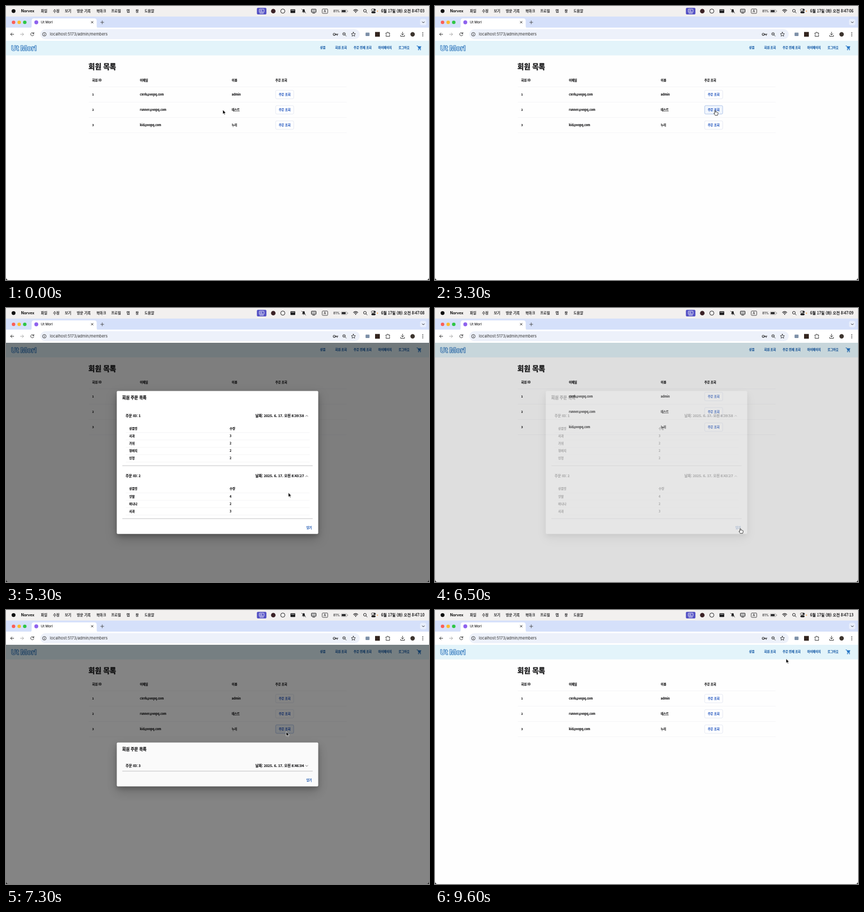
An HTML page for the animation above (10 s loop, 800 by 520 pixels).

```html
<!DOCTYPE html>
<html lang="ko">
<head>
<meta charset="utf-8">
<title>회원 목록</title>
<style>
html, body { margin: 0; width: 100%; height: 100%; overflow: hidden; background: #fff; }
svg { display: block; }
text { font-family: "Noto Sans CJK KR", "Noto Sans CJK JP", "Noto Sans CJK", sans-serif; white-space: pre; }
text.ui { font-family: Inter, Roboto, sans-serif; }
.paper { filter: drop-shadow(0 4px 4px rgba(0, 0, 0, .2)) drop-shadow(0 8px 10px rgba(0, 0, 0, .22)); }
</style>
</head>
<body>
<svg id="stage" width="800" height="520" viewBox="0 0 800 520"></svg>
<script>
const NS = 'http://www.w3.org/2000/svg';
const stage = document.getElementById('stage');
const LOOP = 10000, STEP = 100, BLUE = '#2a62b8', INK = '#1c1c1e';

function set(node, attrs) {
  for (const k in attrs) node.setAttribute(k, attrs[k]);
  return node;
}
function el(parent, tag, attrs = {}) {
  return parent.appendChild(set(document.createElementNS(NS, tag), attrs));
}
const rect = (p, x, y, width, height, fill, more) => el(p, 'rect', { x, y, width, height, fill, ...more });
const dot = (p, cx, cy, r, fill, more) => el(p, 'circle', { cx, cy, r, fill, ...more });
const line = (p, d, stroke = INK, width = 1, more) =>
  el(p, 'path', { d, stroke, 'stroke-width': width, fill: 'none', 'stroke-linecap': 'round', 'stroke-linejoin': 'round', ...more });
const shape = (p, d, fill, more) => el(p, 'path', { d, fill, ...more });

// Text centred vertically on cy; a thin outline thickens the Korean face
function label(p, str, x, cy, size, weight = 700, fill = INK, more) {
  const t = el(p, 'text', {
    x, y: cy + size * .37, 'font-size': size, 'font-weight': weight, fill,
    stroke: fill, 'stroke-width': size * .035, 'stroke-linejoin': 'round', ...more
  });
  t.textContent = str;
  return t;
}
const ui = { class: 'ui', stroke: 'none' };

/* ---------- menu bar ---------- */
function menuBar(g) {
  rect(g, 0, 0, 800, 21, '#f2f0ef');
  dot(g, 14.3, 9.6, 3.7, '#111');
  label(g, 'Norvex', 28.5, 9.8, 7.1, 700, '#111', ui);
  const items = { 파일: 66, 수정: 89, 보기: 111.3, '방문 기록': 134, 북마크: 171, 프로필: 199, 탭: 228, 창: 245, 도움말: 262 };
  for (const k in items) label(g, k, items[k], 9.7, 6.6, 500);

  rect(g, 474.5, 3.5, 18, 12.5, '#5350c4', { rx: 2 });
  rect(g, 479, 6, 9, 6, 'none', { stroke: '#fff', 'stroke-width': .9, rx: .8 });
  line(g, 'M480 14H487M481 8.2H484M481 10H485', '#fff', .8);
  dot(g, 505.5, 9.7, 4.3, '#3b2226');
  dot(g, 523.5, 9.7, 4, 'none', { stroke: INK, 'stroke-width': 1 });
  rect(g, 538, 6.2, 9, 7, INK, { rx: 1 });
  line(g, 'M539.5 8.2H545.5', '#f1eff0', .8);
  shape(g, 'M559.5 11.5L561 10V8.2Q561 6 563 6T565 8.2V10L566.5 11.5ZM562 12.3H564Q563 14 562 12.3Z', INK);
  line(g, 'M559 6L567 13.5', INK, .8);
  rect(g, 577.5, 6, 9, 6, '#bbb', { stroke: INK, 'stroke-width': .9, rx: .8 });
  line(g, 'M580 13.7H584', INK, .9);
  rect(g, 598, 5.7, 10.5, 8.3, 'none', { stroke: INK, 'stroke-width': .8, rx: 1.5 });
  label(g, 'A', 603.2, 9.8, 6, 500, INK, { ...ui, 'text-anchor': 'middle' });
  label(g, '81%', 619, 9.8, 6, 500, INK, ui);
  rect(g, 634, 7, 11, 5.6, 'none', { stroke: '#888', 'stroke-width': .7, rx: 1.6 });
  rect(g, 635, 8, 7.5, 3.6, INK, { rx: .8 });
  rect(g, 645.7, 8.8, 1, 2, '#888');
  line(g, 'M657.2 8.4Q661.3 4.8 665.4 8.4M658.8 10.1Q661.3 8 663.8 10.1', INK, 1.2);
  dot(g, 661.3, 12, 1, INK);
  dot(g, 678.8, 9, 2.6, 'none', { stroke: INK, 'stroke-width': 1 });
  line(g, 'M680.8 11L683 13.2');
  rect(g, 691, 5.7, 8, 3.4, 'none', { stroke: INK, 'stroke-width': .8, rx: 1.7 });
  rect(g, 691, 10.2, 8, 3.6, INK, { rx: 1.8 });
  dot(g, 697, 7.4, 1.6, INK);
  dot(g, 702.5, 9.7, 1, '#f0902a');
  return label(g, '', 791.5, 9.7, 7.2, 500, INK, { 'text-anchor': 'end' });
}

/* ---------- browser frame ---------- */
function browser(g) {
  rect(g, 0, 20, 800, 22, '#d5e0fa');
  ['#fb5f57', '#fdbc2e', '#2fc646'].forEach((c, i) => dot(g, 14.3 + i * 10.6, 31, 3.3, c));
  shape(g, 'M45 41.5Q48.5 41.5 48.5 38V28Q48.5 23.5 53 23.5H167Q171.5 23.5 171.5 28V38Q171.5 41.5 175 41.5Z', '#fff');
  dot(g, 57.3, 31, 3.7, '#8e62ee');
  label(g, 'Ut Morl', 66, 31, 6.3, 500, INK, ui);
  line(g, 'M161.2 29L164.8 32.6M164.8 29L161.2 32.6', INK, .9);
  line(g, 'M179 31H185M182 28V34', '#444', .9);
  rect(g, 783, 24.5, 12, 12, '#e8eefc', { rx: 3.5 });
  line(g, 'M787.3 30L789.3 32L791.3 30', INK, 1);

  rect(g, 0, 41, 800, 25, '#fff');
  line(g, 'M14.7 53.7H8.8M11.4 51L8.7 53.7L11.4 56.4', '#333', 1);
  line(g, 'M27.3 53.7H33.2M30.6 51L33.3 53.7L30.6 56.4', '#aaa', 1);
  line(g, 'M52.3 52A3 3 0 1 0 52.6 54.6M52.7 50.2V52.4H50.4', '#333', 1);
  rect(g, 65, 44, 604, 19, '#edf1fa', { rx: 9.5 });
  dot(g, 72.5, 53.7, 3.4, 'none', { stroke: '#333', 'stroke-width': .9 });
  line(g, 'M72.5 53.5V55.3M72.5 51.9V52', '#333', .9);
  label(g, 'localhost:5173/admin/members', 83, 53.6, 7.4, 400, '#333', ui);
  dot(g, 620.8, 53.7, 2, 'none', { stroke: '#333', 'stroke-width': 1.1 });
  line(g, 'M623 53.2H628M623 54.6H627M626.6 54.6V56', '#333', .9);
  dot(g, 639.3, 53, 2.5, 'none', { stroke: '#333', 'stroke-width': 1 });
  line(g, 'M641.3 55L643.5 57.2M638.2 53H640.4', '#333', .9);
  line(g, 'M657 49.6L658.2 52.3L661 52.6L658.9 54.5L659.5 57.3L657 55.8L654.5 57.3L655.1 54.5L653 52.6L655.8 52.3Z', '#333', .9);
  rect(g, 680, 50.6, 7.5, 6.5, '#7d90a8', { rx: 1 });
  rect(g, 698, 49.3, 9, 9, '#33251f');
  line(g, 'M718.8 51.2H721V50.2Q722 48.8 723 50.2V51.2H725.6V53.4Q723.6 54.2 725.6 55.2V57.6H718.8V55.2Q720.8 54.3 718.8 53.4Z', '#333', 1);
  line(g, 'M750 49.5V54.8M747.6 52.7L750 55L752.4 52.7M746.3 55.6V57.5H753.7V55.6', '#333', 1);
  dot(g, 769, 53.7, 4.2, '#3d352f');
  [50.7, 53.7, 56.7].forEach(y => dot(g, 788.3, y, .85, '#333'));
}

/* ---------- page ---------- */
const rowY = [168, 197, 226];

function page(g) {
  rect(g, 0, 66, 800, 454, '#fefefe');
  rect(g, 0, 66, 800, 27.7, '#e3f4fa');
  label(g, 'Ut Morl', 9.8, 79.8, 13.2, 900, '#cfe5f8', { class: 'ui', stroke: '#3a7fbd', 'stroke-width': .9 });
  const nav = { 상품: 594, '회원 조회': 622.5, '주문 전체 조회': 657.5, 마이페이지: 704, 로그아웃: 742.5 };
  for (const k in nav) label(g, k, nav[k], 79.3, 5.6, 900, '#2667ae');
  line(g, 'M777 75.7H778.6L780.4 80.3H784', '#2574c4', 1);
  shape(g, 'M778.8 76.5H785.6L783.8 80H780.2Z', '#2574c4');
  line(g, 'M779.6 81.6H784.4', '#2574c4', .8);
  dot(g, 780.2, 83.1, .9, '#2574c4');
  dot(g, 783.8, 83.1, .9, '#2574c4');

  label(g, '회원 목록', 156, 115, 13.2, 900);
  const cols = [163, 253.3, 427, 509.5];
  ['회원 ID', '이메일', '이름', '주문 조회'].forEach((s, i) => label(g, s, cols[i], 141.4, 5.6));
  line(g, 'M157 153.5H644', '#f4f4f6', .9);
  const rows = [['1', 'clerk@vopq.com', 'admin'], ['2', 'runner@vopq.com', '테스트'], ['3', 'kid@vopq.com', '누리']];
  return rows.map((cells, r) => {
    const y = rowY[r];
    cells.forEach((s, i) => label(g, s, cols[i], y, 5.4));
    line(g, `M157 ${y + 14.5}H644`, '#f4f4f6', .9);
    const b = rect(g, 510, y - 8, 34, 16, '#fff', { rx: 2, 'stroke-width': .8 });
    label(g, '주문 조회', 527, y - .2, 5.6, 700, '#3463c4', { 'text-anchor': 'middle' });
    return b;
  });
}

/* ---------- order dialog ---------- */
let clipCount = 0;

function accordion(parent, order, last) {
  const g = el(parent, 'g');
  const full = 52 + 14 * order.items.length;
  const id = 'clip' + clipCount++;
  const clip = rect(el(el(g, 'defs'), 'clipPath', { id }), 220, 0, 360, 20, '#000');
  const edge = rect(g, 220, 0, 360, 1, '#bbb');

  const head = el(g, 'g');
  label(head, '주문 ID: ' + order.id, 226.3, 0, 6.5);
  label(head, '날짜: 2025. 6. 17. 오전 ' + order.at, 563.5, 0, 6.5, 700, INK, { 'text-anchor': 'end' });
  const arrow = line(head, 'M-2 -1L0 1L2 -1', '#555', .9);

  const body = el(el(g, 'g', { 'clip-path': `url(#${id})` }), 'g');
  [['상품명', '수량'], ...order.items].forEach(([name, n], i) => {
    const y = i ? 38 + 14 * i : 37.5;
    label(body, name, 233, y, 5.6);
    label(body, n, 423, y, 5.6);
    line(body, `M227 ${45 + 14 * i}H574`, '#f1f1f3', .8);
  });

  return (top, p) => {
    const h = 20.5 + p * (full - 20.5);
    set(g, { transform: `translate(0 ${top})` });
    set(clip, { y: 20, height: Math.max(0, h - 20.5) });
    set(edge, { y: h - .6, fill: last || p > .3 ? '#c2c2c5' : '#e6e6e8' });
    set(head, { transform: `translate(0 ${10.25 + 2.75 * p})` });
    set(arrow, { transform: `translate(568.8 .2) rotate(${180 * p})` });
    set(body, { transform: `translate(0 ${5.5 * (p - 1)})`, display: p ? 'inline' : 'none' });
    return h;
  };
}

function dialog(parent, orders) {
  const g = el(parent, 'g');
  const paper = rect(g, 209.5, 0, 381, 100, '#fff', { rx: 2, class: 'paper' });
  const title = el(g, 'g');
  label(title, '회원 주문 목록', 219.7, 12.6, 7.6);
  const parts = orders.map((o, i) => accordion(g, o, i === orders.length - 1));
  const close = el(g, 'g');
  label(close, '닫기', 573.3, 0, 5.6, 700, BLUE, { 'text-anchor': 'middle' });

  return (opacity, open) => {
    set(g, { opacity, display: opacity ? 'inline' : 'none' });
    if (!opacity) return;
    const gap = parts.length > 1 ? 6.5 * Math.max(...open) : 0;
    const heights = parts.map((f, i) => f(0, open[i]));
    const total = 62.9 + gap + heights.reduce((a, b) => a + b);
    const top = 293.1 - total / 2;
    set(paper, { y: top, height: total });
    set(title, { transform: `translate(0 ${top})` });
    let y = top + 34;
    parts.forEach((f, i) => { y += f(y, open[i]) + gap; });
    set(close, { transform: `translate(0 ${top + total - 11.4})` });
  };
}

/* ---------- build ---------- */
const clock = menuBar(el(stage, 'g'));
const buttons = page(el(stage, 'g'));
browser(el(stage, 'g'));
const shade = rect(stage, 0, 66, 800, 454, '#000');
const first = dialog(stage, [
  { id: 1, at: '8:39:58', items: [['사과', 3], ['가위', 2], ['청바지', 2], ['인형', 2]] },
  { id: 2, at: '8:43:27', items: [['양말', 4], ['바나나', 2], ['사과', 3]] }
]);
const second = dialog(stage, [{ id: 3, at: '8:46:04', items: [['사과', 1]] }]);
shape(stage, 'M0 515Q0 520 5 520H0ZM800 515Q800 520 795 520H800Z', '#111');

const pointer = el(stage, 'g');
const arrowCursor = shape(pointer, 'M0 0V8.2L1.9 6.5L3.1 9.3L4.5 8.7L3.3 6H5.9Z', '#000',
  { stroke: '#fff', 'stroke-width': .7, 'stroke-linejoin': 'round' });
const handCursor = shape(pointer,
  'M-.8 .6Q0 -.6 .8 .6V3.3Q1.8 2.6 2.5 3.5Q3.4 3 4 3.9Q5 3.6 5.2 4.8V6.5L4.4 9.4H-.2L-2.6 5.8Q-2.6 4.5 -.8 5.6Z',
  '#fff', { stroke: '#111', 'stroke-width': .8, 'stroke-linejoin': 'round' });

/* ---------- motion ---------- */
const clamp = v => Math.min(1, Math.max(0, v));

// cubic-bezier(.4, 0, .2, 1)
function ease(x) {
  let lo = 0, hi = 1, s = x;
  for (let i = 0; i < 20; i++) {
    s = (lo + hi) / 2;
    const bx = 1.2 * s * (1 - s) ** 2 + .6 * s * s * (1 - s) + s ** 3;
    if (bx < x) lo = s; else hi = s;
  }
  return x <= 0 ? 0 : x >= 1 ? 1 : 3 * s * s - 2 * s ** 3;
}
const ramp = (t, start, ms) => ease(clamp((t - start) / ms));
const fade = (t, open, close) => ramp(t, open, 225) - ramp(t, close, 195);

const path = [
  [0, 410, 197], [100, 410, 197], [1000, 530, 198], [1150, 530, 198], [1580, 648, 83.5], [1850, 648, 83.5],
  [2150, 530, 198], [3600, 530, 198], [3820, 532, 284], [4280, 532, 284], [4620, 534, 350.5], [5750, 534, 350.5],
  [6200, 577.5, 418.3], [6560, 577.5, 418.3], [7020, 530, 231], [7450, 530, 231], [7820, 532, 294], [8200, 532, 294],
  [8800, 577, 346], [9150, 577, 346], [9580, 664, 92.5], [LOOP, 664, 92.5]
];
const handTimes = [[3800, 4200], [4600, 4950], [6150, 6600], [7800, 8050], [8750, 9200]];

function cursorAt(t) {
  const i = path.findIndex(p => p[0] > t);
  const [t0, x0, y0] = path[i - 1], [t1, x1, y1] = path[i];
  const u = (t - t0) / (t1 - t0), k = u * u * (3 - 2 * u);
  return [x0 + (x1 - x0) * k, y0 + (y1 - y0) * k];
}

function draw(t) {
  const sec = Math.floor(3.45 + t / 1000);
  clock.textContent = '6월 17일 (화) 오전 8:47:' + String(sec).padStart(2, '0');

  const a = fade(t, 3370, 6406), b = fade(t, 7130, 8960);
  first(a, [ramp(t, 4000, 270), ramp(t, 4800, 270)]);
  second(b, [ramp(t, 7900, 250)]);
  set(shade, { opacity: .5 * Math.max(a, b) });

  const [x, y] = cursorAt(t);
  let hand = handTimes.some(([s, e]) => t >= s && t < e);
  buttons.forEach((btn, i) => {
    const over = x > 510 && x < 544 && Math.abs(y - rowY[i]) < 8;
    set(btn, { stroke: over ? '#9db6e4' : '#dde2ef', fill: over ? '#f1f6fd' : '#fff' });
    if (over && !a && !b) hand = true;
  });
  set(pointer, { transform: `translate(${x} ${y})` });
  set(arrowCursor, { visibility: hand ? 'hidden' : 'visible' });
  set(handCursor, { visibility: hand ? 'visible' : 'hidden' });
}

const begin = performance.now();
function tick() {
  const t = (performance.now() - begin) % LOOP;
  draw(Math.floor(t / STEP) * STEP);
  requestAnimationFrame(tick);
}
tick();
</script>
</body>
</html>
```
